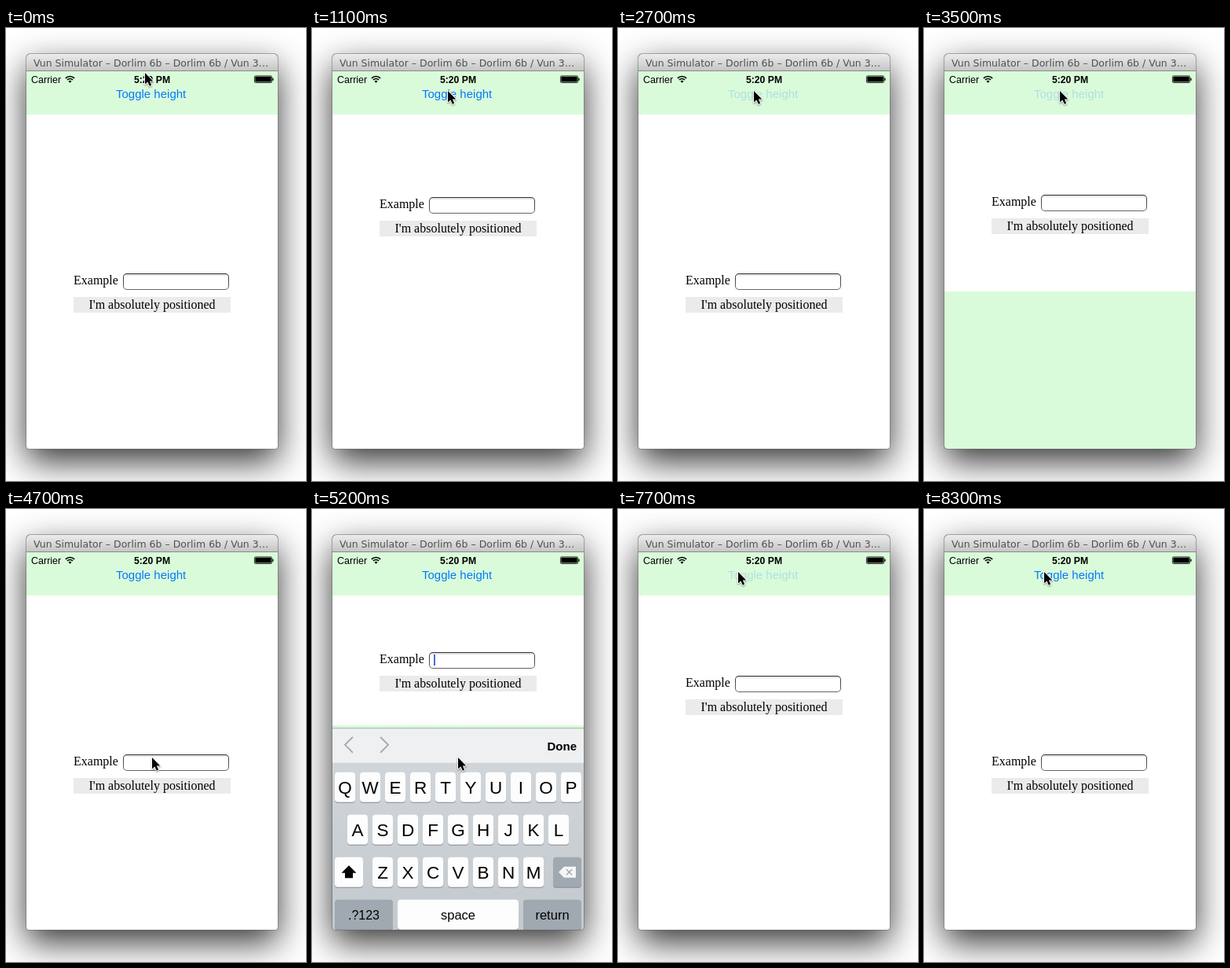
These frames come from a looping animation (382x576 px, 9400 ms). An HTML page with a canvas:

```html
<!DOCTYPE html>
<html lang="en">
<head>
<meta charset="utf-8">
<title>Toggle height</title>
<style>
html, body { margin: 0; width: 100%; height: 100%; overflow: hidden; background: #fff; }
canvas { display: block; }
</style>
</head>
<body>
<canvas id="stage" width="382" height="576"></canvas>
<script>
const ctx = document.getElementById('stage').getContext('2d');
const LOOP = 9400, STEP = 100, MOVE = 340;
const GREEN = '#dafbda';
const SANS = '"Liberation Sans", sans-serif';
const SERIF = '"Liberation Serif", serif';
const TITLE = '"DejaVu Sans", sans-serif';
const TOP = 110, BOTTOM = 535, LEFT = 26, WIDTH = 320;
const TALL = 425, SHORT = 225, TYPING = 165, KEYBOARD = 260;

// Height changes of the web view; press is when the toggle button goes down.
const moves = [
  { start: 800, to: SHORT, press: 800 },
  { start: 1600, to: TALL, press: 1600 },
  { start: 2700, to: SHORT, press: 2700 },
  { start: 3700, to: TALL, press: 3500 },
  { start: 4800, to: TYPING },
  { start: 5800, to: TALL },
  { start: 6900, to: SHORT, press: 6900 },
  { start: 7700, to: TALL, press: 7700 }
];

// Pointer path: time, x, y
const pointerPath = [
  [0, 177, 57], [100, 177, 57], [500, 173, 80], [4100, 173, 80], [4400, 186, 316],
  [5200, 186, 316], [5600, 316, 294], [6100, 316, 294], [6600, 153, 80], [LOOP, 153, 80]
];

const clamp = p => Math.min(1, Math.max(0, p));
const ease = p => 0.5 - 0.5 * Math.cos(Math.PI * clamp(p));
const mix = (a, b, p) => a + (b - a) * p;

function rect(x, y, w, h, fill, radius = 0) {
  ctx.beginPath();
  ctx.roundRect(x, y, w, h, radius);
  ctx.fillStyle = fill;
  ctx.fill();
}

function text(str, x, y, font, color = '#000', align = 'left') {
  ctx.font = font;
  ctx.fillStyle = color;
  ctx.textAlign = align;
  ctx.fillText(str, x, y);
}

function polygon(points, color, x = 0, y = 0) {
  ctx.beginPath();
  points.forEach(([px, py]) => ctx.lineTo(x + px, y + py));
  ctx.closePath();
  ctx.fillStyle = color;
  ctx.fill();
}

function polyline(points, color, width) {
  ctx.beginPath();
  points.forEach(([x, y]) => ctx.lineTo(x, y));
  ctx.strokeStyle = color;
  ctx.lineWidth = width;
  ctx.stroke();
}

function verticalGradient(y0, y1, from, to) {
  const g = ctx.createLinearGradient(0, y0, 0, y1);
  g.addColorStop(0, from);
  g.addColorStop(1, to);
  return g;
}

// Text follows the eased height; the white area keeps the larger one until the move ends.
function viewAt(t) {
  let from = TALL, view = { height: TALL, white: TALL };
  for (const { start, to } of moves) {
    if (t < start) break;
    const p = (t - start) / MOVE;
    view = { height: mix(from, to, ease(p)), white: p < 1 ? Math.max(from, to) : to };
    from = to;
  }
  return view;
}

function toggleAlpha(t) {
  const move = moves.findLast(m => m.press <= t);
  return move ? mix(0.2, 1, clamp((t - move.start - 100) / 200)) : 1;
}

function keyboardTop(t) {
  const shown = 1 - (1 - clamp((t - 4800) / 530)) ** 3;
  const hidden = 1 - (1 - clamp((t - 5800) / 530)) ** 3;
  return BOTTOM - KEYBOARD * (shown - hidden);
}

function pointerAt(t) {
  const i = pointerPath.findIndex(([time]) => time > t);
  const [t0, x0, y0] = pointerPath[i - 1], [t1, x1, y1] = pointerPath[i];
  const p = ease((t - t0) / (t1 - t0));
  return [mix(x0, x1, p), mix(y0, y1, p)];
}

function drawWindow() {
  rect(0, 0, 382, 576, '#fff');
  ctx.save();
  ctx.shadowColor = 'rgba(0,0,0,.8)';
  ctx.shadowBlur = 44;
  ctx.shadowOffsetY = 16;
  rect(LEFT, 33, WIDTH, 502, '#fff', [5, 5, 4, 4]);
  ctx.restore();
  rect(LEFT - 0.5, 32.5, WIDTH + 1, 503, '#666', [5, 5, 4, 4]);
  rect(LEFT, 33, WIDTH, 21, verticalGradient(33, 54, '#ececec', '#c6c6c6'), [5, 5, 0, 0]);
  rect(LEFT, 54, WIDTH, 1, '#8a8a8a');
  text('Vun Simulator – Dorlim 6b – Dorlim 6b / Vun 3…', 35, 49, '12.5px ' + TITLE, '#505050');
}

function drawStatusBar() {
  text('Carrier', 32, 70, '12.5px ' + SANS);
  text('5:20 PM', 186, 70, 'bold 12.2px ' + SANS, '#000', 'center');
  ctx.strokeStyle = '#000';
  ctx.lineWidth = 1.7;
  for (const r of [5, 8]) {
    ctx.beginPath();
    ctx.arc(81.5, 69.5, r, -Math.PI * 0.75, -Math.PI * 0.25);
    ctx.stroke();
  }
  ctx.beginPath();
  ctx.moveTo(81.5, 69.8);
  ctx.arc(81.5, 69.8, 2.8, -Math.PI * 0.75, -Math.PI * 0.25);
  ctx.fillStyle = '#000';
  ctx.fill();
  ctx.lineWidth = 0.8;
  ctx.beginPath();
  ctx.roundRect(316.4, 60.9, 22.2, 8.6, 1.5);
  ctx.stroke();
  rect(317.3, 61.8, 20.4, 6.8, '#000', 0.8);
  rect(339.3, 63.5, 1.3, 3.4, '#000', 0.6);
}

function drawPage({ height, white }, caret) {
  rect(LEFT, TOP, WIDTH, white, '#fff');
  const y = Math.round(TOP + height / 2 - 0.5);
  text('Example', 86, y + 4, '16px ' + SERIF);
  rect(149, y - 10, 135, 21, verticalGradient(y - 10, y + 11, '#333', '#666'), 5);
  rect(150, y - 9, 133, 19, verticalGradient(y - 9, y - 6, '#d4d4d4', '#fff'), 4);
  if (caret) rect(155, y - 7, 2, 14, '#4a6cd4');
  rect(86, y + 20, 200, 20, '#ebebeb');
  text("I'm absolutely positioned", 186, y + 35, '16px ' + SERIF, '#000', 'center');
}

function key(x, y, w, label, size = 22.5, fill = '#fdfdfd') {
  rect(x, y + 1, w, 38, '#868b91', 4);
  rect(x, y, w, 38, fill, 4);
  text(label, x + w / 2, y + 19 + size * 0.36, size + 'px ' + SANS, '#000', 'center');
}

function drawKeyboard(top) {
  if (top >= BOTTOM) return;
  const dark = '#a0a9b1';
  rect(LEFT, top, WIDTH, KEYBOARD, verticalGradient(top + 44, top + KEYBOARD, '#d0d5d9', '#c3c9ce'));
  rect(LEFT, top, WIDTH, 44, '#eff0f1');
  rect(LEFT, top - 0.5, WIDTH, 1, '#9fb3a5');
  for (const [tip, back] of [[42, 52], [97, 87]])
    polyline([[back, top + 11], [tip, top + 21], [back, top + 31]], '#a3a7ab', 1.8);
  text('Done', 337, top + 28, 'bold 15px ' + SANS, '#000', 'right');

  [['QWERTYUIOP', 29], ['ASDFGHJKL', 45], ['ZXCVBNM', 77]].forEach(([letters, x], row) => {
    [...letters].forEach((c, i) => key(x + i * 32, top + 56 + row * 54, 26, c));
  });

  const third = top + 164, fourth = top + 218;
  key(29, third, 36, '');
  polygon([[0, -8.5], [9.5, 1], [5, 1], [5, 7.5], [-5, 7.5], [-5, 1], [-9.5, 1]], '#000', 47, third + 19);
  key(307, third, 36, '', 16, dark);
  polygon([[-11, 0], [-4, -7], [11, -7], [11, 7], [-4, 7]], '#f4f5f6', 325, third + 19);
  polyline([[324, third + 15.5], [331, third + 22.5]], dark, 1.5);
  polyline([[331, third + 15.5], [324, third + 22.5]], dark, 1.5);
  key(29, fourth, 74, '.?123', 16, dark);
  key(109, fourth, 154, 'space', 16.5);
  key(269, fourth, 74, 'return', 16.5, dark);
}

function drawPointer([x, y]) {
  const shape = [[0, 0], [0, 14.5], [3.4, 11.4], [5.8, 16.8], [8.2, 15.8], [5.9, 10.5], [10.3, 10.5]];
  ctx.save();
  ctx.shadowColor = 'rgba(0,0,0,.35)';
  ctx.shadowBlur = 2;
  ctx.shadowOffsetY = 1;
  ctx.lineJoin = 'round';
  ctx.strokeStyle = '#fff';
  ctx.lineWidth = 2;
  polygon(shape, '#000', x, y);
  ctx.stroke();
  ctx.restore();
  polygon(shape, '#000', x, y);
}

function draw(t) {
  drawWindow();
  ctx.save();
  ctx.beginPath();
  ctx.roundRect(LEFT, 55, WIDTH, BOTTOM - 55, [0, 0, 4, 4]);
  ctx.clip();
  rect(LEFT, 55, WIDTH, BOTTOM - 55, GREEN);
  drawStatusBar();
  ctx.globalAlpha = toggleAlpha(t);
  text('Toggle height', 140, 89, '15px ' + SANS, '#007aff');
  ctx.globalAlpha = 1;
  drawPage(viewAt(t), t >= 4900 && t < 5800);
  drawKeyboard(keyboardTop(t));
  ctx.restore();
  drawPointer(pointerAt(t));
}

const origin = performance.now();
function frame() {
  const t = (performance.now() - origin) % LOOP;
  draw(Math.floor(t / STEP) * STEP);
  requestAnimationFrame(frame);
}
frame();
</script>
</body>
</html>
```
